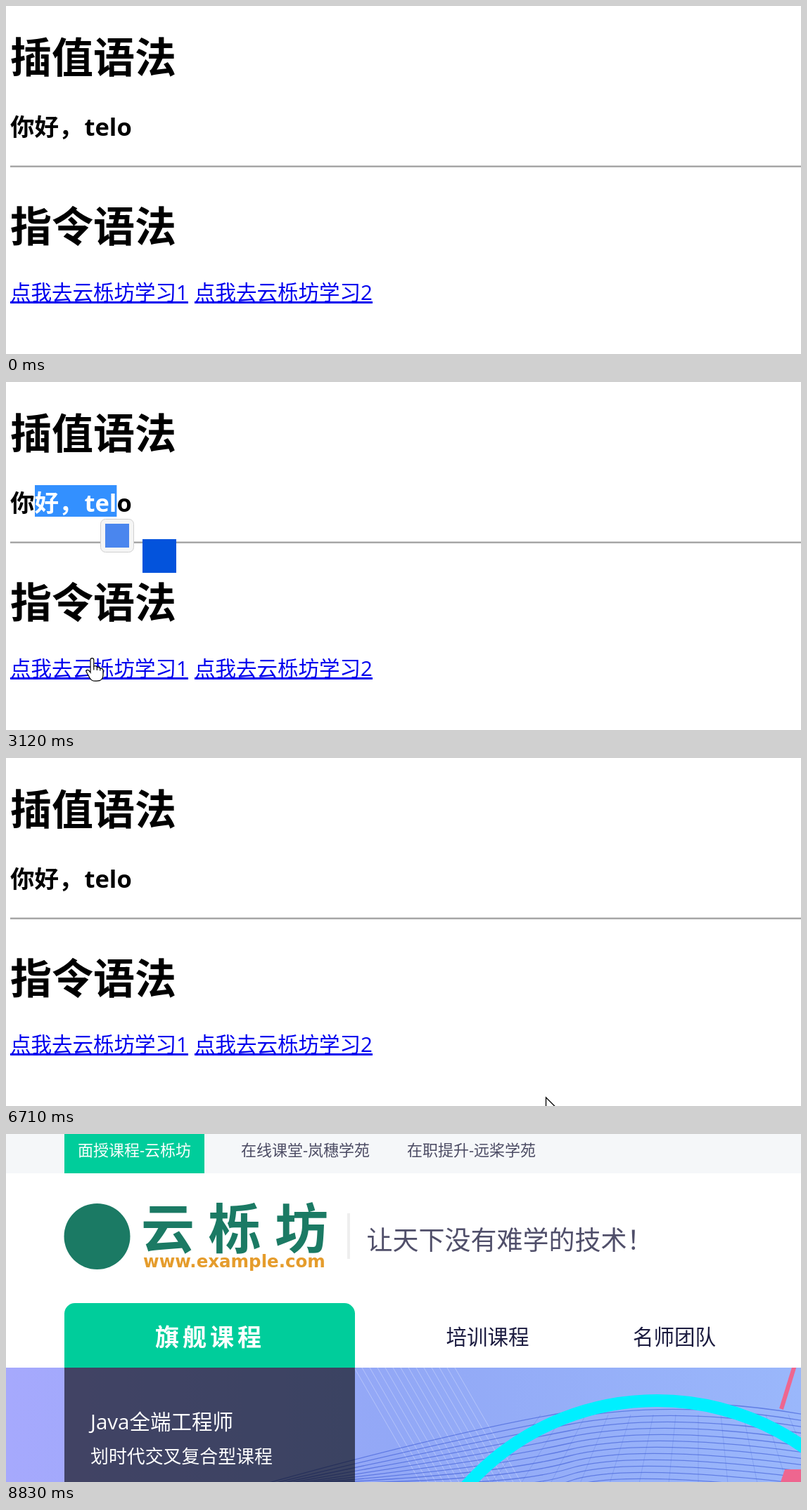
Write an HTML page that moves like this. It is 1130 px wide and 496 px high and loops after 8.89 s.

```html
<!DOCTYPE html>
<html lang="zh-CN">
<head>
<meta charset="utf-8">
<title>语法</title>
<style>
html, body { margin: 0; width: 100%; height: 100%; overflow: hidden; background: #fff; }
svg { display: block; width: 1130px; height: 496px; font-family: "Open Sans", "Noto Sans CJK SC", "Noto Sans CJK", sans-serif; }
text { white-space: pre; }
.h1 { font-size: 59px; font-weight: 700; }
#hello { font-size: 34.5px; font-weight: 700; }
.link { font-size: 29.5px; fill: #00e; }
.link.active { fill: #f00; }
.tab { font-size: 22px; fill: #4c4c64; }
.menu { font-size: 29.5px; fill: #1c1c40; }
.course { fill: #fff; font-weight: 500; }
#beam { mix-blend-mode: difference; }
</style>
</head>
<body>
<svg viewBox="0 0 1130 496">
  <defs>
    <clipPath id="selClip"><rect id="selArea" x="41" y="147" width="0" height="45"/></clipPath>
    <clipPath id="bannerClip"><rect y="333" width="1130" height="163"/></clipPath>
    <linearGradient id="sky">
      <stop offset="0" stop-color="#a6a9fd"/>
      <stop offset=".5" stop-color="#92a8f6"/>
      <stop offset="1" stop-color="#9ab7fb"/>
    </linearGradient>
  </defs>
  <rect width="1130" height="496" fill="#fff"/>

  <g id="lesson">
    <text class="h1" x="6" y="95">插值语法</text>
    <text id="hello" x="6" y="185">你好，<tspan dx="2">telo</tspan></text>
    <rect x="6" y="227.5" width="1124" height="2.3" fill="#a0a0a0"/>
    <text class="h1" x="6" y="335.5">指令语法</text>
    <g class="link"><text x="6" y="419">点我去云栎坊学习1</text><rect x="6" y="421" width="253" height="3"/></g>
    <g class="link" id="link2"><text x="268" y="419">点我去云栎坊学习2</text><rect x="268" y="421" width="253" height="3"/></g>
    <g clip-path="url(#selClip)">
      <rect x="41" y="147" width="130" height="45" fill="#3390ff"/>
      <use href="#hello" fill="#fff"/>
    </g>
    <g id="icons">
      <rect x="134.5" y="195.5" width="47" height="47" rx="7" fill="#f5f5f5" stroke="#d0d0d0"/>
      <rect x="141" y="202" width="34" height="34" fill="#4a86ee"/>
      <rect x="194" y="224" width="48" height="48" fill="#0353dc"/>
    </g>
  </g>

  <g id="site">
    <rect width="1130" height="56" fill="#f5f7f9"/>
    <g id="banner" clip-path="url(#bannerClip)">
      <rect y="333" width="1130" height="163" fill="url(#sky)"/>
      <path id="rays" fill="none" stroke="#fff" opacity=".3"/>
      <path id="ribs" fill="none" stroke="#4a68dc" opacity=".25"/>
      <path id="waves" fill="none" stroke="#3c5ad6" stroke-width="1.3" opacity=".6"/>
      <circle cx="925" cy="742" r="362" fill="none" stroke="#00efff" stroke-width="18"/>
      <path d="M1121 330L1102 392" stroke="#ee668f" stroke-width="6"/>
      <path d="M1107 478H1130V496H1101z" fill="#ee668f"/>
    </g>
    <g id="page">
      <rect x="98" width="199" height="56" fill="#00cd9b"/>
      <text class="tab" x="117" y="31" style="fill:#fff">面授课程-云栎坊</text>
      <text class="tab" x="349" y="31">在线课堂-岚穗学苑</text>
      <text class="tab" x="585" y="31">在职提升-远桨学苑</text>
      <rect x="500" y="113" width="4" height="65" fill="#eee"/>
      <text id="slogan" y="165" font-size="37" fill="#504f6a">让天下没有难学的技术！</text>
      <path d="M98 333V256a15 15 0 0 1 15-15H496a15 15 0 0 1 15 15V333z" fill="#00cd9b"/>
      <text x="227" y="302" font-size="34" font-weight="900" letter-spacing="5" fill="#fff">旗舰课程</text>
      <text class="menu" x="640.5" y="300">培训课程</text>
      <text class="menu" x="906" y="300">名师团队</text>
      <rect x="98" y="333" width="413" height="163" opacity=".6"/>
      <text class="course" x="135" y="421" font-size="29.5">Java全端工程师</text>
      <text class="course" x="135" y="469" font-size="25.9">划时代交叉复合型课程</text>
    </g>
    <g id="brand">
      <circle cx="129.5" cy="146" r="47" fill="#1b7a64"/>
      <text x="192" y="163" font-size="76" font-weight="700" letter-spacing="19" fill="#1b7a64">云栎坊</text>
      <text x="195" y="190" font-size="24.5" font-weight="700" fill="#e59c2c" font-family="DejaVu Sans, sans-serif">www.example.com</text>
    </g>
  </g>

  <g id="arrow"><path d="M.7 1V25.2l5.5-5.2 4.2 8.4 3.8-1.8-4-8.2h7.8z" fill="#fff" stroke="#000" stroke-width="1.3"/></g>
  <g id="beam"><path d="M-7-13h5.5L0-11.5 1.500-13H7M-7 13h5.5L0 11.5 1.5 13H7M0-12V12" fill="none" stroke="#fff" stroke-width="2.4"/></g>
  <g id="hand" stroke="#000" stroke-width="1.2">
    <path transform="translate(-8)" fill="#fff" d="M7 21V3a2.4 2.4 0 0 1 4.8 0v9q4-1 4.6 1.6 3.6-1 4.4 1.7 3.6-.6 4.2 2.7v7q0 8-9 8.2h-2.5q-5 0-7.500-4.500L1.4 20.5q-1.2-3 1.6-3.2 1.6 0 4 3.7z"/>
    <path transform="translate(-8)" d="M11.8 12v5.5M16.4 14v4M20.8 15.500v3"/>
  </g>
</svg>
<script>
const LOOP = 8890, STEP = 70;
const RELEASE = 2570, DESELECT = 3530, CLICK = 7380, OPEN = 8470, LOADED = 8830;

const $ = id => document.getElementById(id);
const show = (id, on) => { $(id).style.display = on ? '' : 'none'; };
const easeOut = u => 1 - (1 - u) ** 2;

// The pointer glides on from wherever the last glide left it.
const home = [1134, 517];
const glides = [
  { from: 450, until: 1270, to: [408, 229] },
  { from: 1340, until: 1900, to: [42, 168] },
  { from: 2160, until: 2160, to: [48, 176] },
  { from: 2230, until: RELEASE, to: [160, 178] },
  { from: 2640, until: 2980, to: [130, 356] },
  { from: 3050, until: 3120, to: [121, 393] },
  { from: 3190, until: 3470, to: [386, 325] },
  { from: 3540, until: 4020, to: [169, 410] },
  { from: 5160, until: 5160, to: [249, 414] },
  { from: 5230, until: 5370, to: [403, 424] },
  { from: 5570, until: 5850, to: [900, 505] },
  { from: 6710, until: 7120, to: [398, 421] },
  { from: 7450, until: 7720, to: [750, 502] }
];

function pointer(t) {
  let pos = home;
  for (const { from, until, to } of glides) {
    if (t < from) break;
    const steps = Math.round((until - from) / STEP) + 1;
    const done = Math.min(steps, Math.floor((t - from) / STEP) + 1);
    const k = easeOut(done / steps);
    pos = pos.map((v, i) => v + (to[i] - v) * k);
  }
  return pos;
}

function shapeAt(x, y) {
  const inside = (l, t, r, b) => x >= l && x <= r && y >= t && y <= b;
  if (inside(6, 388, 259, 428) || inside(268, 388, 521, 428)) return 'hand';
  if (inside(6, 147, 180, 193) || inside(6, 275, 242, 352)) return 'beam';
  return 'arrow';
}

// Selection grows by whole characters.
const hello = $('hello');
const charEnds = [...hello.textContent].map((c, i) => hello.getEndPositionOfChar(i).x);

function selectionWidth(t) {
  if (t < 2160 || t >= DESELECT) return 0;
  const [x] = pointer(Math.min(t, RELEASE));
  return Math.max(0, Math.max(...charEnds.filter(end => end <= x + 8)) - 41);
}

function drawBanner() {
  const lines = (id, count, line) =>
    $(id).setAttribute('d', Array.from({ length: count }, (_, i) => line(i)).join(''));
  lines('rays', 14, i => `M${495 + i * 11} 333L${590 + i * 11} 498`);
  lines('ribs', 12, i => `M${760 + i * 32} 400L${690 + i * 42} 498`);
  lines('waves', 13, i => `M${370 + i * 10} 498Q${640 + i * 8} ${423 + i * 9} 800 ${396 + i * 9}T1135 ${400 + i * 9}`);
}

function draw(t) {
  const onSite = t >= OPEN, loaded = t >= LOADED;
  const [x, y] = pointer(t);
  const shape = shapeAt(x, y);

  show('lesson', !onSite);
  show('site', onSite);
  show('banner', loaded);
  show('brand', loaded);
  $('page').setAttribute('transform', `translate(${loaded ? -15 : 0})`);
  $('slogan').setAttribute('x', loaded ? 527.5 : 148);

  $('selArea').setAttribute('width', selectionWidth(t));
  show('icons', t >= RELEASE + STEP && t < DESELECT);
  $('link2').classList.toggle('active', t >= CLICK && t < CLICK + STEP);

  for (const id of ['arrow', 'beam', 'hand']) {
    show(id, !onSite && id === shape);
    $(id).setAttribute('transform', `translate(${x} ${y})`);
  }
}

function tick() {
  draw(performance.now() % LOOP);
  requestAnimationFrame(tick);
}

drawBanner();
tick();
</script>
</body>
</html>
```
